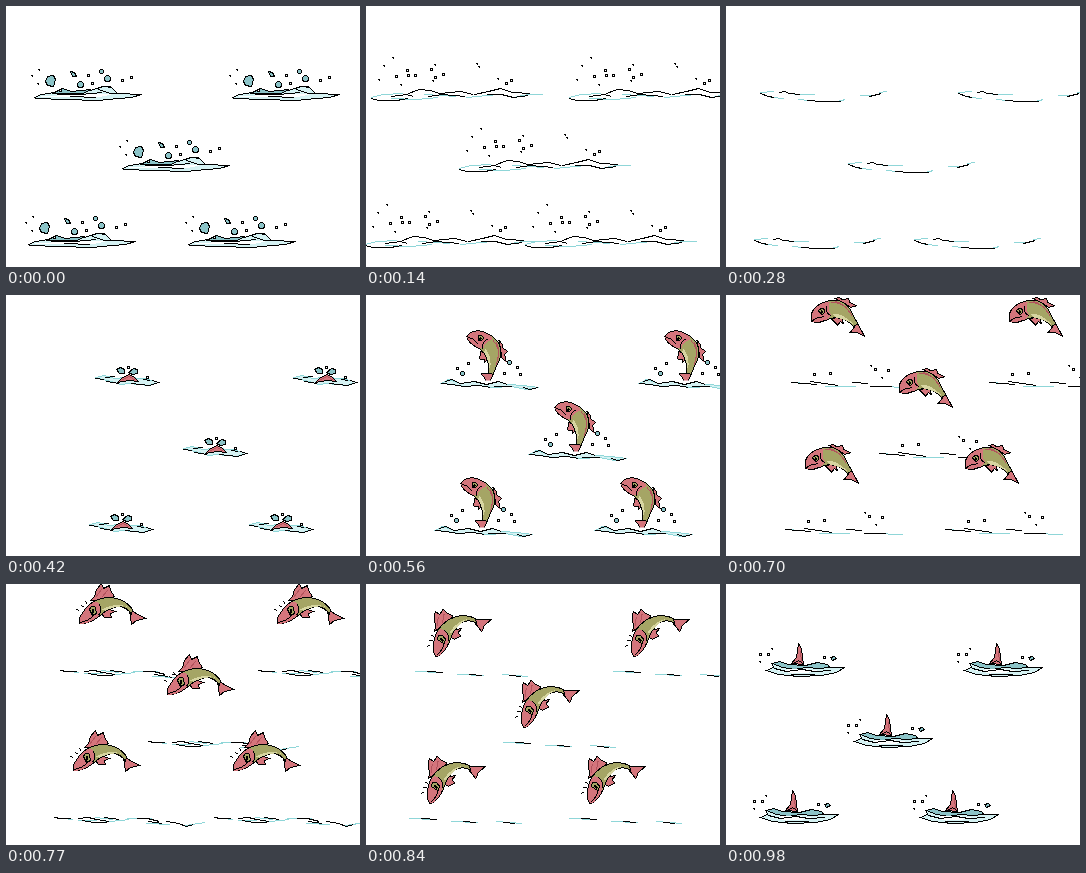
Animation of 354x261 px, one loop 1.05 s. Source, as an HTML page:

```html
<!DOCTYPE html>
<html lang="en">
<head>
<meta charset="utf-8">
<title>Leaping fish</title>
<style>
html, body { margin: 0; width: 100%; height: 100%; overflow: hidden; background: #fff; }
svg { display: block; width: 354px; height: 261px; shape-rendering: crispEdges; }
</style>
</head>
<body>
<svg viewBox="0 0 354 261">
  <defs>
    <clipPath id="air"><path d="M-60-40H260V85H-60Z"/></clipPath>
    <g id="cel"></g>
  </defs>
  <g id="school"></g>
</svg>
<script>
const STEP = 70, BLACK = '#000', PINK = '#d4757c', ROSE = '#b4545e',
      OLIVE = '#a5a565', CREAM = '#d6d5a0', TEAL = '#8cc4c8', FOAM = '#d5f2f3', AQUA = '#8fd6d8';

const line = (pts, color = BLACK, w = 1) =>
  `<polyline points="${pts}" fill="none" stroke="${color}" stroke-width="${w}"/>`;
const lines = (list, color, w) => list.split('/').map(p => line(p, color, w)).join('');
const shape = (pts, fill, stroke = BLACK) =>
  `<polygon points="${pts}" fill="${fill}" stroke="${stroke}"/>`;
const path = (d, fill, stroke = BLACK) => `<path d="${d}" fill="${fill}" stroke="${stroke}"/>`;
const spots = (list, make) => list.split(' ').map(p => make(...p.split(',').map(Number))).join('');
const dots = list => spots(list, (x, y) => `<path d="M${x - .5} ${y}h1.5m-1 1h1" stroke="#000"/>`);
const rings = list => spots(list, (x, y, r = 1.4) =>
  `<ellipse cx="${x}" cy="${y}" rx="${r}" ry="${r}" fill="${r > 1.5 ? TEAL : '#fff'}" stroke="#000"/>`);
const move = (art, x, y, turn, cx, cy) =>
  `<g transform="translate(${x} ${y}) rotate(${turn} ${cx} ${cy})">${art}</g>`;
const above = art => `<g clip-path="url(#air)">${art}</g>`;

const rising =
  shape('121,15 126,17 128,20 134,21 133,25 138,31 132,30 129,25', PINK) +
  path('M128 44 L132 46 L133 62 L128 56 L121 53 L127 50Z', PINK) +
  path('M110 33 L113 41 L117 39 L119 42 L120 34Z', PINK) +
  path('M91 27 Q92 18 102 15 Q116 13 124 19 Q132 26 131 38 L132 48 L127 49 Q125 41 118 36 Q112 31 105 32 L97 31Z', OLIVE) +
  path('M91 27 Q92 18 102 15 Q111 14 115 17 Q110 23 111 29 L105 32 L97 31Z', PINK, 'none') +
  path('M113 29 Q120 31 125 40 L128 47 Q123 39 114 33Z', CREAM, 'none') +
  path('M116 18 Q127 21 129 33 M120 18 Q129 25 130 38', 'none', ROSE) +
  path('M91 27 Q98 25 104 28 M92 29 L98 31 L106 32 M111 19 Q106 24 111 30 M91 27 Q92 18 102 15 Q116 13 124 19 Q132 26 131 38 L132 47', 'none') +
  path('M101 20 Q105 18 107 21 Q107 25 103 25Z', OLIVE) + line('104,21 104,24', BLACK, 2);

const diving =
  shape('84,16 88,12 90,5 95,-1 97,4 103,1 104,6 108,12 99,15', PINK) +
  path('M122 23 L128 28 L139 34 L130 36 L125 40 L124 32Z', PINK) +
  path('M94 28 L98 33 L105 33 L104 29 L109 27 L103 25Z', PINK) +
  path('M73 39 L73 33 L79 24 Q87 14 101 13 Q118 13 126 25 L125 30 Q120 22 112 22 Q101 24 95 30 Q87 37 78 39Z', OLIVE) +
  path('M73 39 L73 33 L79 24 Q85 17 91 17 Q96 22 93 30 Q87 37 78 39Z', PINK, 'none') +
  path('M96 25 Q108 18 120 22 Q110 21 99 26Z', CREAM, 'none') +
  path('M89 13 L95 5 M95 13 L101 6', 'none', ROSE) +
  path('M74 38 Q83 36 87 31 M93 20 Q96 25 92 31 M73 39 L73 33 L79 24 Q87 14 101 13 Q118 13 126 25', 'none') +
  path('M83 25 Q85 20 89 23 L90 29 L86 31Z', OLIVE) + line('86,25 87,29', BLACK, 2) +
  lines('75,21 78,23/79,17 81,20/70,25 73,26');

const ripple =
  lines('5,91 16,88 37,87/25,92 50,93 72,91/58,88 90,90/100,91 132,88/150,90 163,88 176,88', AQUA) +
  lines('5,92 12,94 30,94 42,92/25,90 40,88 47,90/42,87 53,83 64,84 73,87 94,85 107,88/62,90 76,88 99,90/108,88 122,85 134,82 146,86 164,87/120,88 135,88 147,91 162,89');

const lateRipple =
  lines('34,86 48,85/44,91 58,92/67,88 88,88/72,93 83,94/111,95 119,93/133,89 145,89/153,86 161,85', AQUA) +
  lines('34,87 42,90 48,91/53,86 58,85 63,87 74,88/81,94 95,95 114,95/143,90 155,87');

const launch =
  shape('75,88 82,84 94,88 108,86 119,89 132,86 141,89 157,90 172,92 160,94 145,91 126,92 112,90 98,91 87,89', FOAM, AQUA) +
  lines('75,88 85,89 98,91 112,90 124,92/79,86 85,84 94,88 108,86 120,89 132,86 141,89/127,91 145,91/157,92 163,94 172,92');

const spray = dots('82,72 86,76 90,72 146,60') +
  rings('101,75 103,71 132,73 147,63 150,68 154,72 159,66 162,78 143,80 161,84');

const calm =
  lines('61,87 73,88/77,89 96,89/95,86 113,88/100,91 129,88/126,87 151,87/146,92 170,93/185,94 205,91', AQUA) +
  lines('54,86 60,87 70,87/78,87 88,86 96,88 109,90/82,89 93,91 106,91/104,86 119,88/136,87 147,87 159,90/148,90 162,92/166,90 178,92 186,95 193,93');

const crown =
  shape('28,91 35,88 48,86 56,82 64,85 84,84 96,80 104,80 111,87 135,88 125,91 112,92 91,94 60,93 29,92', FOAM) +
  shape('46,87 56,82 65,85 84,83 77,87', TEAL) +
  path('M34 90 Q70 87 106 87 Q100 91 77 91Z', '#fff', 'none') +
  lines('84,84 97,80 105,81 111,87/92,83 104,87 111,87/50,88 74,88 96,86/64,90 90,91');

const plop =
  shape('40,86 47,83 46,79 53,77 62,80 78,81 91,78 101,80 104,83 118,83 110,88 95,91 72,92 52,90', FOAM) +
  shape('46,79 53,77 62,80 79,81 91,78 101,80 103,83 93,84 79,83 68,85 56,83', TEAL) +
  path('M52 86 Q70 83 91 86 Q84 89 66 89Z', '#fff', 'none') +
  lines('48,84 60,87 76,85 88,87 105,86/64,90 88,90');

const swell =
  shape('89,82 98,80 108,83 119,82 139,83 152,87 142,90 123,88 114,89 105,86 96,84', FOAM, AQUA) +
  lines('89,83 98,84/99,82 109,81/100,86 113,88/125,88 143,90 152,87 146,85/137,84 144,85');

const cels = [
  crown + dots('32,63 25,69 31,77') +
    path('M41 70 L47 69 L49 73 L47 80 L41 79 L39 75Z', TEAL) +
    path('M64 65 L68 66 L70 70 L66 70Z', TEAL) +
    rings('74,78,3 101,72,3 95,65,2 86,77 82,69 116,74 125,71 54,84'),
  move(ripple, 12, 8, 0, 0, 0).replace('rotate(0 0 0)', 'scale(.87 .91)') +
    dots('28,57 20,64 20,75 121,65') +
    rings('37,72,2.5 43,67 66,63,2 73,74,2 84,70 103,67,2 112,69 131,73 136,75'),
  ripple + dots('26,51 17,59 12,73 34,78 66,74 110,57 112,60 131,72') +
    rings('30,70 41,64 42,69 49,69 65,63 69,71 77,68 140,77 145,74') + dots('68,58'),
  lines('14,90 34,87/38,92 63,93/70,89 108,91/128,90 158,89/158,87 171,87', AQUA) +
    lines('14,91 25,93 44,93/43,87 57,84 70,87/68,93 87,92 110,93/115,89 134,85 148,88 164,88'),
  lateRipple,
  lines('57,89 68,91/88,94 112,94/132,90 145,89', AQUA) +
    lines('91,86 104,84 119,86/113,88 132,88'),
  swell + shape('111,87 116,82 123,79 128,82 132,86 123,85', PINK) +
    line('116,84 123,81 129,85', ROSE) +
    path('M110 74 L114 72 L118 74 L118 78 L113 78Z', TEAL) +
    path('M122 77 L127 73 L131 74 L131 78 L126 79Z', TEAL) +
    rings('122,72 141,82'),
  swell + above(move(rising, 5, 41, 35, 116, 34)) +
    rings('101,75,2.5 94,79 139,73,2.5 148,76 108,67 150,81'),
  launch + above(move(rising, 3, 25, 28, 116, 34)) +
    rings('91,73 96,78,2 102,68 143,67,2 151,72 154,79 138,78'),
  launch + rising + lines('94,14 97,16/99,12 103,13') + spray,
  lines('65,87 81,88/98,91 129,91/151,91 183,92', AQUA) +
    lines('65,87 78,88 91,89/84,86 98,88 112,90/126,87 142,88/143,91 165,91') +
    move(rising, -5, -12, -24, 116, 34) + rings('88,79 104,78 149,74 162,75') + dots('144,70 155,82'),
  calm + diving,
  lines('49,87 74,88/91,90 118,91/136,90 162,92', AQUA) +
    lines('61,87 77,88/103,90 116,91/143,91 155,92') +
    move(diving, -17, 20, -30, 105, 20),
  above(move(diving, -46, 48, -62, 105, 20)) +
    shape('43,86 53,82 63,84 72,82 86,84 101,85 92,89 68,90 52,89', FOAM) +
    lines('48,85 61,87 80,86 96,86') +
    rings('45,76,2 38,79 94,77,2 101,79'),
  plop + path('M65 79 L70 73 L72 59 L75 64 L77 80Z', PINK) + line('74,67 75,78', ROSE) +
    lines('67,79 72,76 78,80') + path('M104 73 L108 72 L110 74 L106 76Z', TEAL) +
    dots('45,64 33,77') + rings('34,70 42,70 98,73')
];

const cel = document.getElementById('cel');
document.getElementById('school').innerHTML =
  [[0, 0], [198, 0], [88, 71], [-6, 147], [154, 147]]
    .map(([x, y]) => `<use href="#cel" x="${x + .5}" y="${y + .5}"/>`).join('');

let shown = -1;
function draw(now) {
  const i = Math.floor(now / STEP) % cels.length;
  if (i !== shown) cel.innerHTML = cels[shown = i];
  requestAnimationFrame(draw);
}
draw(performance.now());
</script>
</body>
</html>
```
